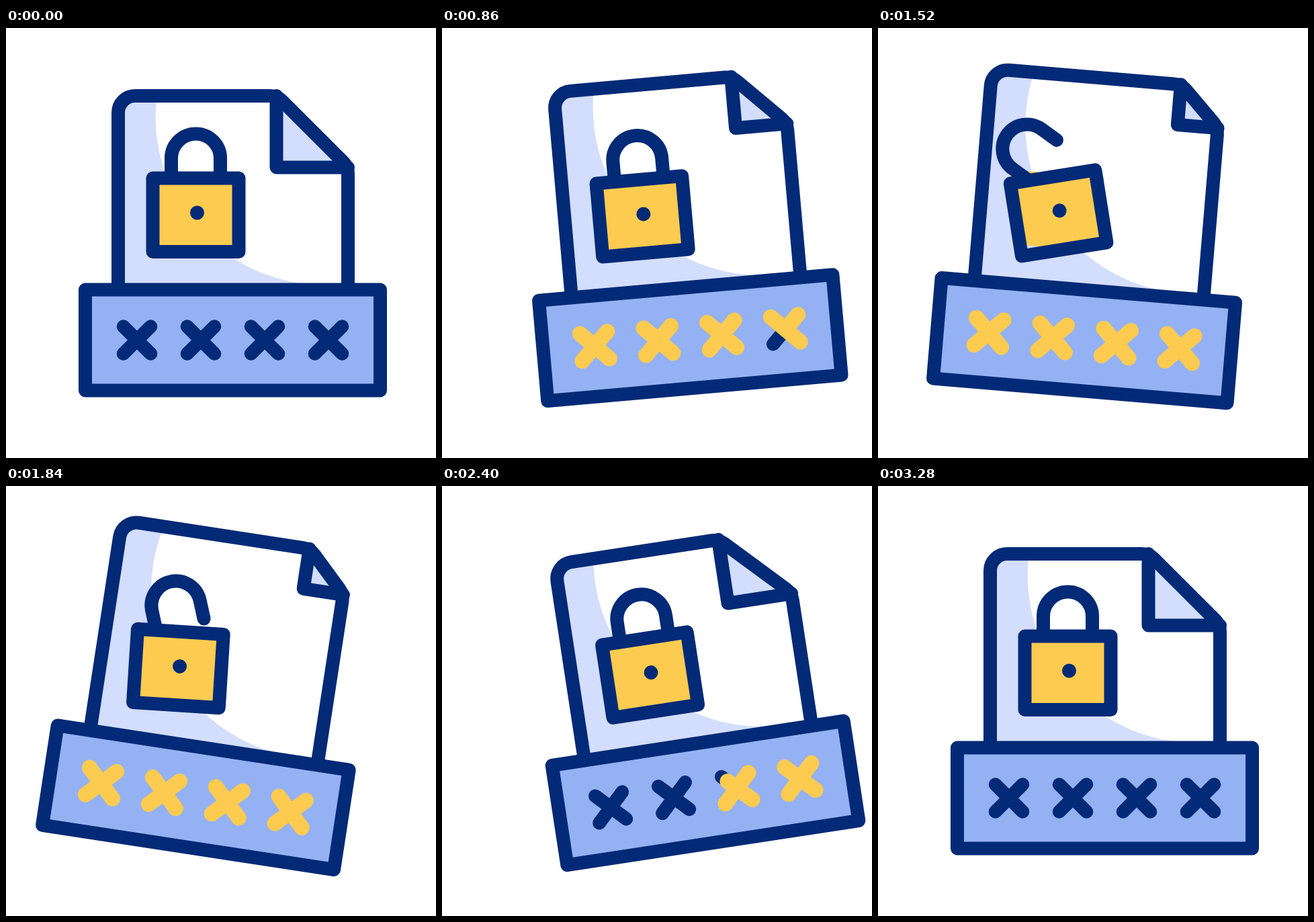
Recreate the animation shown at these times as an HTML page with a canvas. Size 640 by 640 pixels, loop 3.6 s.

```html
<!DOCTYPE html>
<html lang="en">
<head>
<meta charset="utf-8">
<title>Password unlock</title>
<style>
  html, body { margin: 0; width: 100%; height: 100%; overflow: hidden; background: #fff; }
  canvas { display: block; width: 640px; height: 640px; }
</style>
</head>
<body>
<canvas id="stage" width="640" height="640"></canvas>
<script>
const ctx = document.getElementById('stage').getContext('2d');
const LOOP = 3600;
const NAVY = '#032a76', BLUE = '#94b1f3', PALE = '#d3ddfd', GOLD = '#fdcb50', WHITE = '#fff';

const clamp = x => Math.min(1, Math.max(0, x));
const span = (t, a, b) => clamp((t - a) / (b - a));
const smooth = u => u * u * (3 - 2 * u);
const ramp = (t, a, b) => smooth(span(t, a, b));

// Ease with a longer tail: bezier (.33, 0, .4, 1)
function settle(x) {
  let lo = 0, hi = 1;
  for (let i = 0; i < 24; i++) {
    const u = (lo + hi) / 2, v = 1 - u;
    if (0.99 * u * v * v + 1.2 * u * u * v + u ** 3 < x) lo = u; else hi = u;
  }
  return smooth(lo);
}

function swing(t) {
  return -8.75 * ramp(t, 595, 1078)
    + 18.5 * ramp(t, 1086, 1745)
    - 18.5 * ramp(t, 1752, 2361)
    + 8.75 * settle(span(t, 2361, 3100));
}
const lift = t => ramp(t, 530, 1085) - ramp(t, 2022, 2572);
const tilt = t => -14 * (ramp(t, 1140, 1550) - ramp(t, 1550, 2040));
const open = t => -45 * (ramp(t, 920, 1485) - ramp(t, 1530, 2050));

function rotate(deg, x, y) {
  ctx.translate(x, y);
  ctx.rotate(deg * Math.PI / 180);
  ctx.translate(-x, -y);
}

function stroke(color = NAVY, width = 20) {
  ctx.strokeStyle = color;
  ctx.lineWidth = width;
  ctx.stroke();
}

function fill(color) {
  ctx.fillStyle = color;
  ctx.fill();
}

function disc(x, y, r, color) {
  ctx.beginPath();
  ctx.arc(x, y, r, 0, 2 * Math.PI);
  fill(color);
}

function pagePath(top, size) {
  ctx.beginPath();
  ctx.moveTo(167, 389.5);
  ctx.arcTo(167, top, 338, top, 25);
  ctx.arcTo(509 - size + 1, top, 509, top + size - 1, 25);
  ctx.arcTo(509, top + size - 1, 509, 389.5, 25);
  ctx.lineTo(509, 389.5);
}

function drawPage(p) {
  const top = 101 - 28 * p, size = 106.5 - 46.5 * p;
  const fx = 509 - size, fy = top + size;

  ctx.save();
  pagePath(top, size);
  fill(PALE);
  ctx.clip();
  disc(472.5, 132, 250, WHITE);
  // the circle's right half keeps the page white to its edge
  ctx.fillRect(472, top - 20, 60, 402 - top);
  ctx.fillRect(300, top - 20, 220, 60);
  ctx.restore();

  ctx.beginPath();
  ctx.moveTo(fx, top);
  ctx.lineTo(fx, fy);
  ctx.lineTo(509, fy);
  fill(PALE);
  stroke();

  pagePath(top, size);
  stroke();
}

function drawLock(t) {
  ctx.fillStyle = GOLD;
  ctx.fillRect(218.5, 220.5, 128, 110);

  ctx.save();
  rotate(tilt(t), 284.5, 275);

  ctx.save();
  rotate(open(t), 246, 223);
  ctx.beginPath();
  ctx.moveTo(246, 223);
  ctx.lineTo(246, 194);
  ctx.arc(282.5, 194, 36.5, Math.PI, 0);
  ctx.lineTo(319, 222);
  stroke();
  ctx.restore();

  ctx.beginPath();
  ctx.rect(218.5, 223.5, 128, 109.5);
  stroke();
  disc(284.5, 275, 10.5, NAVY);
  ctx.restore();
}

// One arm of a cross: dir 1 runs down-right, -1 runs down-left
function arm(x, dir, from, to, color, width) {
  if (to - from < 0.001) return;
  const y = 464.5, r = 20.3;
  const at = k => r * (2 * k - 1);
  ctx.beginPath();
  ctx.moveTo(x + dir * at(from), y + at(from));
  ctx.lineTo(x + dir * at(to), y + at(to));
  stroke(color, width);
}

function drawField(t) {
  ctx.beginPath();
  ctx.rect(118, 389.5, 439, 150);
  fill(BLUE);
  stroke();

  const drawn = (t - 120) / 99, erased = (t - 2061) / 81;
  for (let i = 0; i < 8; i++) {
    arm(195 + 95 * (i >> 1), i % 2 ? -1 : 1, 0, 1, NAVY, 20);
  }
  for (let i = 0; i < 8; i++) {
    arm(195 + 95 * (i >> 1), i % 2 ? -1 : 1, clamp(erased - i), clamp(drawn - i), GOLD, 23);
  }
}

function draw(t) {
  ctx.fillStyle = WHITE;
  ctx.fillRect(0, 0, 640, 640);
  ctx.lineCap = ctx.lineJoin = 'round';
  ctx.save();
  rotate(swing(t), 315, 101);
  drawPage(lift(t));
  drawLock(t);
  drawField(t);
  ctx.restore();
}

const start = performance.now();
function frame(now) {
  draw(Math.max(0, now - start) % LOOP);
  requestAnimationFrame(frame);
}
draw(0);
requestAnimationFrame(frame);
</script>
</body>
</html>
```
